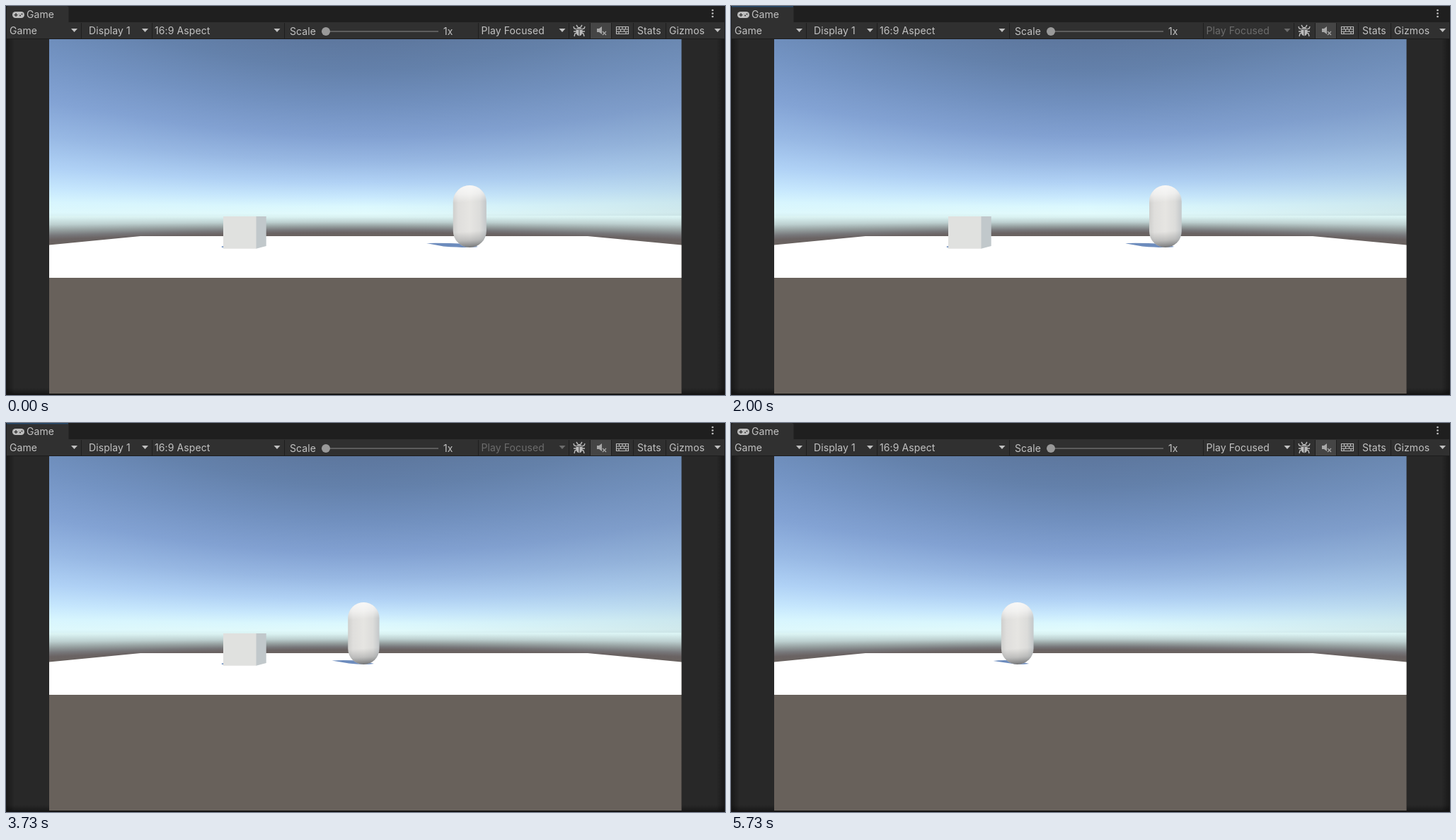
Recreate the animation shown at these times as an HTML page with a canvas. Size 1016 by 551 pixels, loop 7340 ms.

```html
<!DOCTYPE html>
<html lang="en">
<head>
<meta charset="utf-8">
<title>Game view</title>
<style>
  html, body { margin: 0; width: 100%; height: 100%; overflow: hidden; background: #282828; }
  canvas { display: block; }
</style>
</head>
<body>
<canvas id="stage" width="1016" height="551"></canvas>
<script>
const W = 1016, H = 551, LOOP = 7340, STEP = 200 / 3;
const VIEW = { left: 61, right: 954.5, top: 47, bottom: 549, horizon: 298, focal: 435 };
const stage = document.getElementById('stage').getContext('2d');
let ctx;

function rect(x, y, w, h, fill) {
  ctx.fillStyle = fill;
  ctx.fillRect(x, y, w, h);
}

function poly(fill, ...points) {
  ctx.fillStyle = fill;
  ctx.beginPath();
  for (let i = 0; i < points.length; i += 2) ctx.lineTo(points[i], points[i + 1]);
  ctx.fill();
}

function rounded(x, y, w, h, r, fill) {
  ctx.fillStyle = fill;
  ctx.beginPath();
  ctx.roundRect(x, y, w, h, r);
  ctx.fill();
}

function dot(x, y, r, fill) {
  ctx.fillStyle = fill;
  ctx.beginPath();
  ctx.arc(x, y, r, 0, Math.PI * 2);
  ctx.fill();
}

function strokePath(d, color, width) {
  ctx.strokeStyle = color;
  ctx.lineWidth = width;
  ctx.stroke(new Path2D(d));
}

function text(s, x, y, color = '#c2c2c2') {
  ctx.font = '14px Inter, sans-serif';
  ctx.letterSpacing = '0.1px';
  ctx.fillStyle = color;
  ctx.fillText(s, x, y);
}

function arrow(x, color = '#c0c0c0') {
  poly(color, x - 4.5, 32, x + 4.5, 32, x, 37);
}

function gradient(x0, y0, x1, y1, stops) {
  const g = ctx.createLinearGradient(x0, y0, x1, y1);
  for (const [at, color] of stops) g.addColorStop(at, color);
  return g;
}

// Colours by height on the middle column; other columns stretch about the horizon.
const SKY = [
  [47, '#5d779e'], [90, '#6380aa'], [140, '#7190bf'], [185, '#82a1d2'], [220, '#98b8e3'],
  [250, '#b1d2f5'], [270, '#c8e8fd'], [284, '#dbf8fe'], [294, '#e2fbfc'], [299, '#d9f1f1'],
  [306, '#bdd0d0'], [312, '#959f9f'], [317, '#77777a'], [321, '#6a6363'], [330, '#68615b']
];

function drawSky() {
  const { left, right, top, bottom, horizon, focal } = VIEW;
  for (let x = left; x < right; x++) {
    const stretch = Math.hypot(1, (x - 508) / focal);
    const y0 = horizon - 251 * stretch, y1 = horizon + 32 * stretch;
    const stops = SKY.map(([y, color]) => [(y - 47) / 283, color]);
    rect(x, top, Math.min(1, right - x), bottom - top, gradient(0, y0, 0, y1, stops));
  }
  rect(left, top, right - left, 250, gradient(left, 0, right, 0,
    [[0, 'rgba(150,200,255,.06)'], [.5, 'rgba(120,150,180,0)'], [1, 'rgba(100,125,140,.14)']]));
}

function drawPads() {
  for (const [x, dir] of [[0, 1], [W, -1]]) {
    rect(Math.min(x, x + dir * 61), 46, 61, 505, '#282828');
    rect(Math.min(x, x + dir * 12), 46, 12, 505, gradient(x, 0, x + dir * 12, 0,
      [[0, 'rgba(0,0,0,.4)'], [1, 'rgba(0,0,0,0)']]));
  }
  rect(0, 46, W, 1, '#1d1d1d');
  rect(0, 541, 61, 8, gradient(0, 541, 0, 549, [[0, 'rgba(0,0,0,0)'], [1, 'rgba(0,0,0,.35)']]));
  rect(955, 541, 61, 8, gradient(0, 541, 0, 549, [[0, 'rgba(0,0,0,0)'], [1, 'rgba(0,0,0,.35)']]));
  rect(0, 549, W, 2, '#141313');
}

function drawIcons() {
  const light = '#bdbdbd', dark = '#303030';
  // gamepad
  rounded(9, 8, 17, 9, 4.5, light);
  rect(11.5, 12, 5, 1.3, dark);
  rect(13.4, 10, 1.3, 5, dark);
  dot(20, 13.5, 1, dark);
  dot(22.5, 11.5, 1, dark);
  // bug
  ctx.fillStyle = light;
  ctx.beginPath();
  ctx.ellipse(810, 36, 4.6, 6.3, 0, 0, 7);
  ctx.fill();
  strokePath('M802 29l1 3 4 1M818 29l-1 3-4 1M802 36h16M803 43l1-4 3-1M817 43l-1-4-3-1M806 27l2 3M814 27l-2 3', light, 1.4);
  strokePath('M805.5 33h9M810 34v8', dark, 1);
  // muted speaker
  poly('#a8a8a8', 835, 32, 838, 32, 842, 29, 842, 40, 838, 37, 835, 37);
  strokePath('M843 36l5 5M848 36l-5 5', '#a8a8a8', 1.3);
  // keyboard
  strokePath('M862.5 29.5h17v10h-17zM862 33h18M862 36.3h18M866.5 29v4M871 29v4M875.5 29v4M868.5 33v3M873.5 33v3M866 36v4M876 36v4', light, 1.1);
  for (const y of [6, 10.5, 15]) dot(998.5, y, 1.3, '#c4c4c4');
}

function drawToolbar() {
  rect(0, 0, W, 23, '#1f1f1f');
  rounded(1, 0, 87.5, 25, [3, 3, 0, 0], '#303030');
  rect(0, 23, W, 23, '#303030');
  rect(826, 24, 29, 22, '#454545');
  for (const x of [106, 206, 393, 667, 795, 825, 855, 886, 932]) rect(x, 24, 1, 22, '#1e1e1e');
  rect(0, 0, 1, H, '#191919');
  rect(W - 1, 0, 1, H, '#191919');
  text('Game', 29, 17);
  text('Game', 5, 40);
  text('Display 1', 117, 40);
  text('16:9 Aspect', 210, 40);
  text('Scale', 401, 41);
  text('1x', 618, 41);
  text('Stats', 892, 40);
  text('Gizmos', 937, 40);
  [96.5, 196.5, 383, 1005.5].forEach(x => arrow(x));
  rect(446, 35, 165, 2, '#5d5d5d');
  dot(452, 36, 6, '#999999');
  drawIcons();
}

function drawBackdrop() {
  rect(0, 0, W, H, '#282828');
  drawSky();
  poly('#fff', 190, 326, 822, 326, 954.5, 338.5, 954.5, 385, 61, 385, 61, 338.5);
  drawPads();
  drawToolbar();
}

function drawCube() {
  poly('#6d8cbd', 304, 341, 308, 339.5, 308, 343);
  poly('#e0e1df', 307, 298, 354, 298, 354, 343.7, 307, 343.7);
  poly('#c1c8cb', 353.5, 298, 367.7, 298, 367.7, 340, 353.5, 343.7);
}

function drawCapsule(x) {
  const width = 44.3 + .00013 * (x - 508) ** 2;
  const left = x - width / 2, top = 254, height = 88;
  const side = (x - 404.5) / 250;
  const tip = x - 34 - 27 * side, end = x + 16.5 - 5 * side;

  ctx.fillStyle = '#6d8cbd';
  ctx.beginPath();
  ctx.moveTo(tip, 337 - side);
  ctx.quadraticCurveTo(tip + 14, 335, x, 337);
  ctx.lineTo(end, 341);
  ctx.quadraticCurveTo(x, 343.2, tip + 24, 340.5);
  ctx.closePath();
  ctx.fill();

  rounded(left, top, width, height, width / 2, gradient(left, 0, left + width, 0,
    [[0, '#cfcfcd'], [.16, '#dfdedc'], [.5, '#e6e5e2'], [.8, '#dcdcda'], [1, '#c3c7c9']]));
  rounded(left, top, width, height, width / 2, gradient(x - 3, top, x + 3, top + height,
    [[0, 'rgba(255,255,255,.75)'], [.14, 'rgba(255,255,255,.5)'], [.27, 'rgba(255,255,255,0)'],
     [.74, 'rgba(120,120,120,0)'], [.88, 'rgba(110,112,114,.32)'], [1, 'rgba(85,87,90,.8)']]));
}

// Distance covered: steady speed with equal ramps at start and end.
function travel(t) {
  const speed = .0626, ramp = 667, start = 1005, brake = 5008;
  const ramped = u => u <= 0 ? 0 : u < ramp ? u * u / (2 * ramp) : u - ramp / 2;
  return speed * (ramped(t - start) - ramped(t - brake));
}

function render(time) {
  const step = Math.floor((time - 1196) / STEP);
  const playing = step >= 0 && step < 68;
  ctx.drawImage(backdrop, 0, 0);
  if (playing) rect(1, 0, 87, 1.5, '#25496b');
  const color = playing ? '#6c6c6c' : '#c2c2c2';
  text('Play Focused', 671.5, 40, color);
  arrow(786, color);
  if (step < 67) drawCube();
  drawCapsule(655.3 - (step < 0 ? 0 : travel(1200 + step * STEP)));
}

const backdrop = document.createElement('canvas');
backdrop.width = W;
backdrop.height = H;
ctx = backdrop.getContext('2d');
drawBackdrop();
ctx = stage;

const began = performance.now();
function tick() {
  render((performance.now() - began) % LOOP);
  requestAnimationFrame(tick);
}
tick();
</script>
</body>
</html>
```
